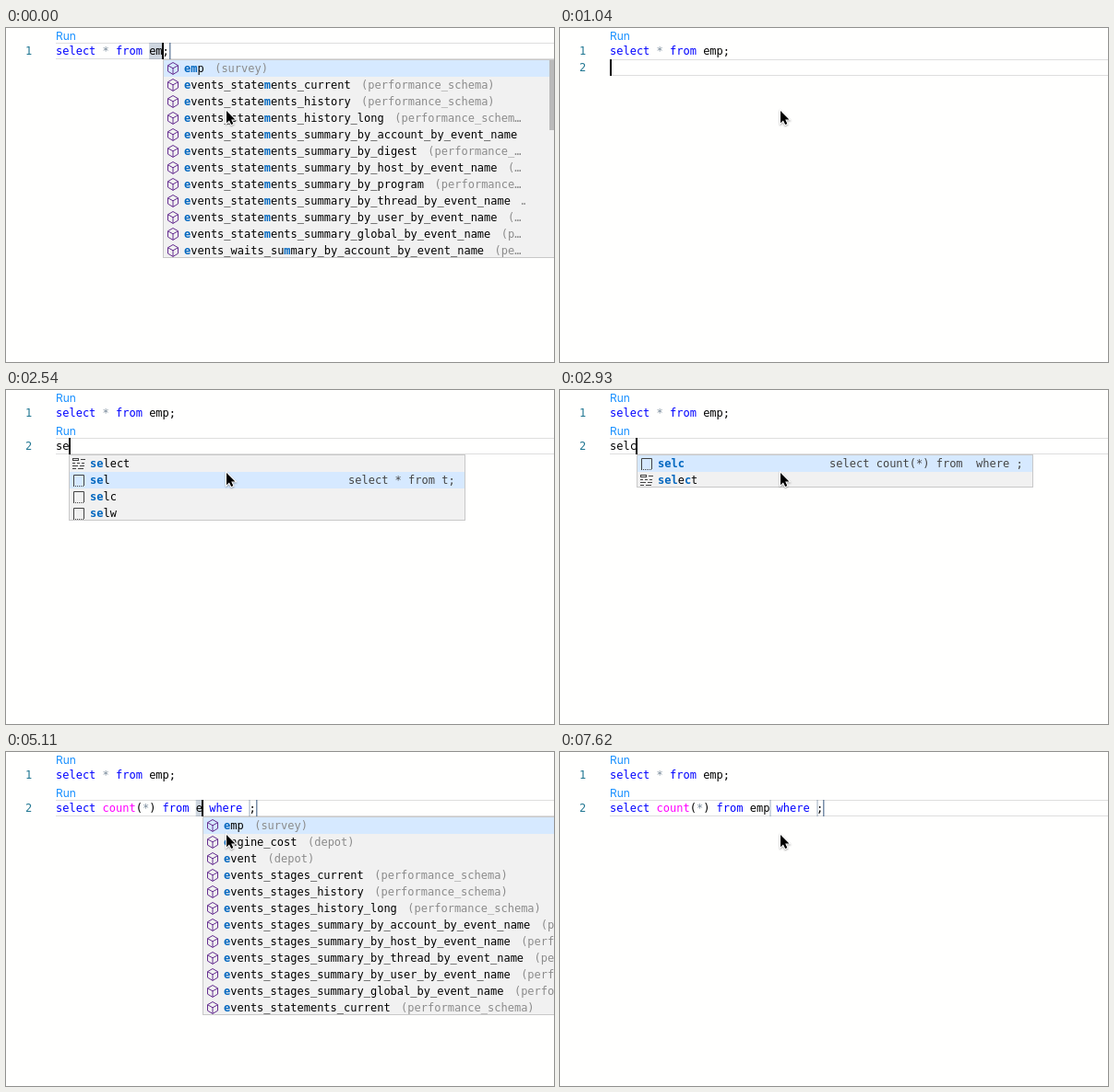
These frames come from a looping animation (594x363 px, 8000 ms). An HTML page with a canvas:

```html
<!DOCTYPE html>
<html lang="en">
<head>
<meta charset="utf-8">
<style>
  html, body { margin: 0; width: 100%; height: 100%; overflow: hidden; background: #fffffe; }
  canvas { display: block; }
</style>
</head>
<body>
<canvas id="stage" width="594" height="363"></canvas>
<script>
const ctx = document.getElementById('stage').getContext('2d');
const LOOP = 8000, ADV = 7.224, LEFT = 54, ROW = 18;
const MONO = '12px "DejaVu Sans Mono", monospace';
const col = n => LEFT + n * ADV;

const words = s => s.split(' ');
const rows = (names, note) => words(names).map(name => ({ name, note, icon: 'cube' }));
const snippet = (name, hint) => ({ name, hint, icon: 'snippet' });
const keyword = { name: 'select', icon: 'keyword' };
const PERF = '(performance_schema)', SURVEY = '(survey)';
const COUNT = 'select count(*) from ';

const statementRows = [
  ...rows('emp', SURVEY),
  ...rows('current history history_long summary_by_account_by_event_name summary_by_digest ' +
    'summary_by_host_by_event_name summary_by_program summary_by_thread_by_event_name ' +
    'summary_by_user_by_event_name summary_global_by_event_name', PERF)
    .map(r => ({ ...r, name: 'events_statements_' + r.name })),
  ...rows('events_waits_summary_by_account_by_event_name', PERF)
];
const tableRows = [
  ...rows('dept emp tmpdata table_a uqs_answer uqs_dict uqs_dict_type uqs_info uqs_survey user', SURVEY),
  ...rows('aa', ''),
  { name: 'survey', icon: 'schema' }
];
const stageRows = [
  ...rows('emp', SURVEY),
  ...rows('engine_cost event', '(depot)'),
  ...rows('current history history_long summary_by_account_by_event_name ' +
    'summary_by_host_by_event_name summary_by_thread_by_event_name ' +
    'summary_by_user_by_event_name summary_global_by_event_name', PERF)
    .map(r => ({ ...r, name: 'events_stages_' + r.name })),
  ...rows('events_statements_current', PERF)
];
const selectRows = [
  keyword,
  snippet('sel', 'select * from t;'),
  snippet('selc', COUNT + ' where ;'),
  snippet('selw', 'select * from t where ;')
];
const selcRows = [selectRows[2], keyword];

const list = (items, query, picked = 0, extra = {}) => ({ items, query, picked, ...extra });

// fill: [from, to] highlighted field; gap: empty field column; end: final tab stop column
const steps = [
  { at: 0, one: 'select * from em;', caret: 16, fill: [14, 16], end: 17,
    popup: list(statementRows, 'em', 0, { scroll: true }) },
  { at: 30, caret: 17, gap: [17], end: 18 },
  { at: 720, caret: 18 },
  { at: 1040, two: '', caret: 0 },
  { at: 1340, two: 's', caret: 1, popup: list(selectRows, 's', 1) },
  { at: 1580, two: 's', caret: 1, lens: true, popup: list(selectRows, 's', 1) },
  { at: 2540, two: 'se', caret: 2, lens: true, popup: list(selectRows, 'se', 1) },
  { at: 2720, two: 'sel', caret: 3, lens: true, popup: list(selectRows, 'sel', 1) },
  { at: 2930, two: 'selc', caret: 4, lens: true, popup: list(selcRows, 'selc') },
  { at: 3910, two: COUNT + ' where ;', caret: 21, lens: true, gap: [21, 28], end: 29,
    popup: list(tableRows, '') },
  { at: 5110, two: COUNT + 'e where ;', caret: 22, lens: true, fill: [21, 22], gap: [29], end: 30,
    popup: list(stageRows, 'e') },
  { at: 5580, two: COUNT + 'emp where ;', caret: 24, lens: true, gap: [24, 31], end: 32 },
  { at: 6120, two: COUNT + 'emp where ;', caret: 31, lens: true, gap: [24, 31], end: 32 }
];
const blinks = [540, 1820, 2330, 3400, 4390, 4870, 6090, 6630, 7110, 7620];

function rect(x, y, w, h, color) {
  ctx.fillStyle = color;
  ctx.fillRect(x, y, w, h);
}

function text(s, x, y, color, font = MONO) {
  ctx.font = font;
  ctx.fillStyle = color;
  ctx.fillText(s, x, y);
}

function path(points, close) {
  ctx.beginPath();
  points.forEach(([x, y]) => ctx.lineTo(x, y));
  if (close) ctx.closePath();
}

function line(...points) {
  path(points);
  ctx.stroke();
}

function tokenColor(token) {
  if (/^(select|from|where)$/.test(token)) return '#0000ff';
  if (token === 'count') return '#ff00ff';
  return token === '*' ? '#778899' : '#000000';
}

function codeLine(number, code, top) {
  text(number, 21, top + 13, '#237893');
  for (const m of code.matchAll(/\w+|\S/g)) text(m[0], col(m.index), top + 13, tokenColor(m[0]));
}

function lens(baseline) {
  text('Run', LEFT, baseline, '#1890ff', '12px Inter, sans-serif');
}

const icons = {
  cube() {
    ctx.strokeStyle = '#652d90';
    path([[8, 1.5], [13.5, 4.7], [13.5, 11.1], [8, 14.4], [2.5, 11.1], [2.5, 4.7]], true);
    ctx.stroke();
    line([2.5, 4.7], [8, 7.8], [13.5, 4.7]);
    line([8, 7.8], [8, 14.4]);
  },
  snippet() {
    ctx.strokeStyle = '#424242';
    line([2.5, 14], [2.5, 2.5], [13.5, 2.5], [13.5, 14]);
    ctx.setLineDash([1, 1]);
    line([2, 14.5], [14, 14.5]);
    ctx.setLineDash([]);
  },
  keyword() {
    ctx.strokeStyle = '#424242';
    ctx.strokeRect(1.5, 2.5, 6, 2);
    line([10, 3.5], [15, 3.5]);
    line([1, 7.5], [4, 7.5]);
    line([6, 7.5], [9, 7.5]);
    line([11, 7.5], [14, 7.5]);
    line([1, 10.5], [7, 10.5]);
    line([9, 10.5], [14, 10.5]);
    line([1, 13.5], [5, 13.5]);
    line([7, 13.5], [13, 13.5]);
  },
  schema() {
    ctx.strokeStyle = '#d67e00';
    const diamond = (x, y, r) => {
      path([[x, y - r], [x + r, y], [x, y + r], [x - r, y]], true);
      ctx.stroke();
    };
    diamond(4.8, 5, 3);
    diamond(12.3, 6.8, 1.9);
    diamond(12.3, 12, 1.9);
    line([7.5, 6.5], [10.4, 6.5]);
    line([7.5, 6.5], [7.5, 12], [10.4, 12]);
  }
};

function icon(name, x, y) {
  ctx.save();
  ctx.translate(x, y);
  ctx.lineWidth = 1;
  icons[name]();
  ctx.restore();
}

function label(name, query, x, y) {
  let next = 0;
  [...name].forEach((ch, i) => {
    const hit = next < query.length && ch === query[next];
    if (hit) next++;
    text(ch, x + i * ADV, y, hit ? '#0066bf' : '#000000', hit ? 'bold ' + MONO : MONO);
  });
}

function note(s, x, limit, y) {
  if (x >= limit) return;
  const room = Math.max(1, Math.floor((limit - x) / ADV));
  ctx.save();
  ctx.beginPath();
  ctx.rect(x, y - 14, limit - x, ROW);
  ctx.clip();
  text(s.length > room ? s.slice(0, room - 1) + '…' : s, x, y, '#8b8b8b');
  ctx.restore();
}

function drawPopup({ items, query, picked, scroll }, x, top) {
  const width = 430, height = items.length * ROW;
  ctx.save();
  ctx.beginPath();
  ctx.rect(x, top, width, height);
  ctx.clip();
  rect(x, top, width, height, '#f1f1f1');
  items.forEach((item, i) => {
    const y = top + 1 + i * ROW, tx = x + 23, base = y + 13;
    if (i === picked) rect(x, y, width, ROW, '#d6e9ff');
    icon(item.icon, x + 3, y + 1);
    label(item.name, query, tx, base);
    if (item.note) note(item.note, tx + item.name.length * ADV + 11.5, x + 393, base);
    if (item.hint && i === picked) text(item.hint, x + 418.6 - item.hint.length * ADV, base, '#444444');
  });
  if (scroll) rect(x + 419, top + 1, 10, 76, '#bababa');
  ctx.strokeStyle = '#c8c8c8';
  ctx.lineWidth = 1;
  ctx.strokeRect(x + 0.5, top + 0.5, width - 1, height - 1);
  ctx.restore();
}

function pointer() {
  ctx.save();
  ctx.translate(239, 90);
  path([[0, 0], [0, 13.2], [3, 10.4], [5.2, 15], [7.3, 14], [5.2, 9.6], [9.4, 9.4]], true);
  ctx.shadowColor = 'rgba(0,0,0,.35)';
  ctx.shadowBlur = 2;
  ctx.shadowOffsetY = 1;
  ctx.lineWidth = 2;
  ctx.strokeStyle = '#ffffff';
  ctx.stroke();
  ctx.shadowColor = 'transparent';
  ctx.fillStyle = '#000000';
  ctx.fill();
  ctx.restore();
}

function draw(t) {
  const s = steps.findLast(step => step.at <= t);
  const second = s.two !== undefined;
  const secondTop = s.lens ? 52 : 34;
  const top = second ? secondTop : 16;

  rect(0, 0, 594, 363, '#fffffe');
  rect(LEFT, top, 540, 1, '#dedede');
  rect(LEFT, top + 17, 540, 1, '#dedede');

  if (s.fill) {
    const [from, to] = s.fill.map(col);
    rect(from, top, to - from, ROW, 'rgba(10,50,100,.2)');
  }
  (s.gap || []).forEach(n => rect(Math.round(col(n)), top, 2, ROW, 'rgba(10,50,100,.2)'));
  if (s.end) rect(Math.round(col(s.end)), top, 1.5, ROW, 'rgba(10,50,100,.55)');

  lens(12.5);
  codeLine('1', s.one || 'select * from emp;', 16);
  if (s.lens) lens(48.5);
  if (second) codeLine('2', s.two, secondTop);

  const toggles = blinks.filter(b => b > s.at && b <= t).length;
  if (toggles % 2 === 0) rect(Math.max(LEFT, Math.floor(col(s.caret) - 0.25)), top, 2, ROW, '#000000');

  if (s.popup) drawPopup(s.popup, Math.round(col(s.caret)), top + ROW);
  pointer();
}

const start = performance.now();
function tick() {
  draw((performance.now() - start) % LOOP);
  requestAnimationFrame(tick);
}
tick();
</script>
</body>
</html>
```
